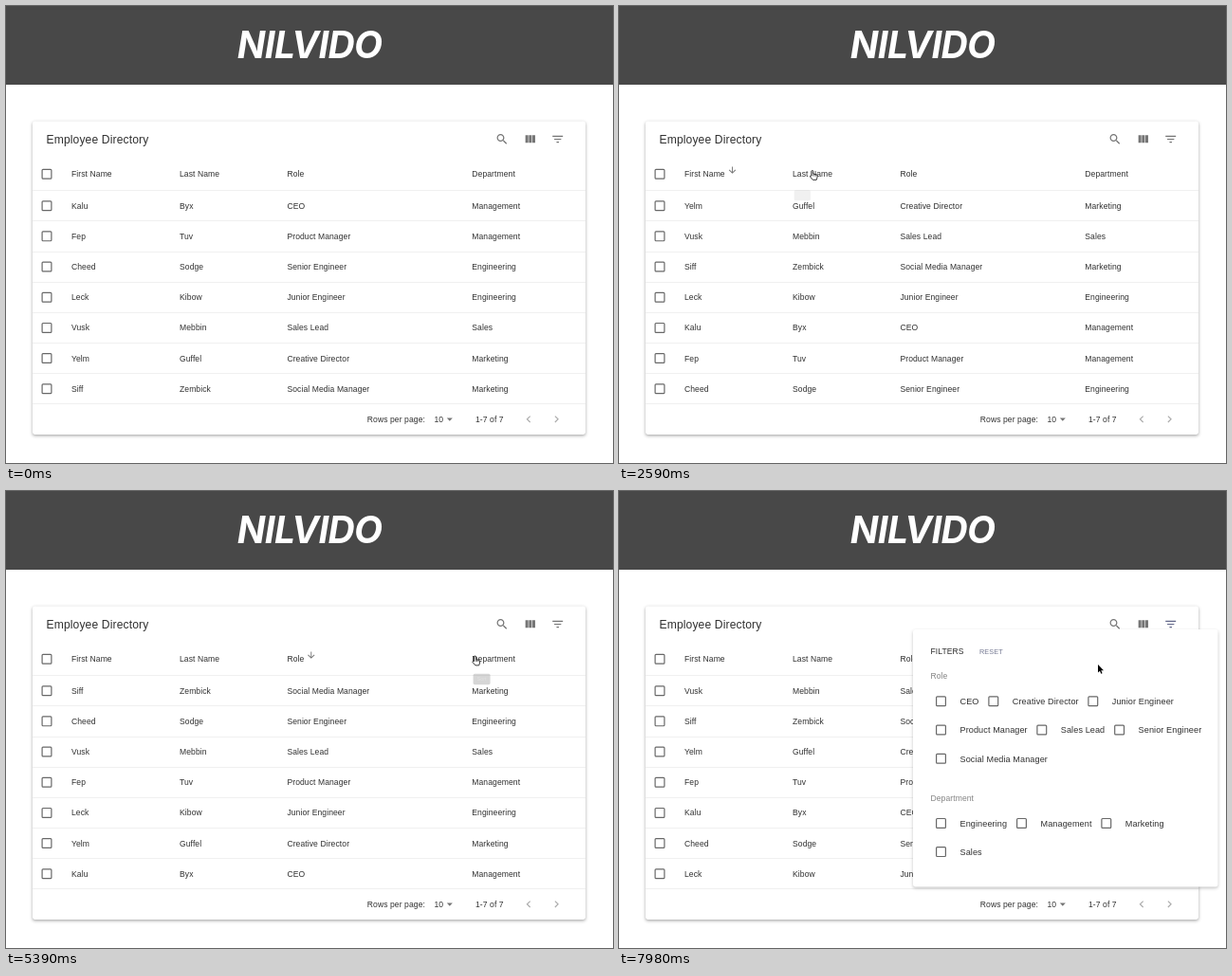
An HTML page with a canvas that plays this animation: 640x482 px, repeating every 8000 ms.

```html
<!DOCTYPE html>
<html lang="en">
<head>
<meta charset="utf-8">
<title>Employee Directory</title>
<style>
html, body { margin: 0; width: 100%; height: 100%; overflow: hidden; background: #fff; }
canvas { display: block; width: 640px; height: 482px; }
</style>
</head>
<body>
<canvas id="stage"></canvas>
<script>
const W = 640, H = 482, LOOP = 8000;
const canvas = document.getElementById('stage');
const ctx = canvas.getContext('2d');
const dpr = window.devicePixelRatio || 1;
canvas.width = W * dpr;
canvas.height = H * dpr;

const SANS = '"Liberation Sans", Arial, sans-serif';
const INK = '#303030', GREY = '#757575', LINE = '#f0f0f0';
const ICON = 14.6;

const icons = {
  search: 'M15.5 14h-.79l-.28-.27C15.41 12.59 16 11.11 16 9.5 16 5.91 13.09 3 9.5 3S3 5.91 3 9.5 5.91 16 9.5 16c1.61 0 3.09-.59 4.23-1.57l.27.28v.79l5 4.99L20.49 19l-4.99-5zm-6 0C7.01 14 5 11.99 5 9.5S7.01 5 9.5 5 14 7.01 14 9.5 11.99 14 9.5 14z',
  columns: 'M10 18h5V5h-5v13zm-6 0h5V5H4v13zM16 5v13h5V5h-5z',
  filter: 'M10 18h4v-2h-4v2zM3 6v2h18V6H3zm3 7h12v-2H6v2z',
  down: 'M20 12l-1.41-1.41L13 16.17V4h-2v12.17l-5.58-5.59L4 12l8 8 8-8z',
  drop: 'M7 10l5 5 5-5z',
  prev: 'M15.41 7.41L14 6l-6 6 6 6 1.41-1.41L10.83 12z',
  next: 'M8.59 16.59L10 18l6-6-6-6-1.41 1.41L13.17 12z'
};
for (const k in icons) icons[k] = new Path2D(icons[k]);
const arrowShape = new Path2D('M0 0V8.6L2 6.8 3.3 9.8 4.6 9.2 3.3 6.3H6z');
const handShape = new Path2D('M-1 5.6V.9a.9.9 0 0 1 1.8 0V3.6L4 4.2q1.3.3 1.2 1.7L4.8 8 4.2 9.9H.4L-2.6 6.4q.2-1.3 1.6-.8z');

const columns = [
  { name: 'First Name', x: 69, arrow: 119.5 },
  { name: 'Last Name', x: 183, arrow: 232.5 },
  { name: 'Role', x: 296.4, arrow: 321.8 },
  { name: 'Department', x: 491.3, arrow: 544.8 }
];
const people = [
  ['Kalu', 'Byx', 'CEO', 'Management'],
  ['Fep', 'Tuv', 'Product Manager', 'Management'],
  ['Cheed', 'Sodge', 'Senior Engineer', 'Engineering'],
  ['Leck', 'Kibow', 'Junior Engineer', 'Engineering'],
  ['Vusk', 'Mebbin', 'Sales Lead', 'Sales'],
  ['Yelm', 'Guffel', 'Creative Director', 'Marketing'],
  ['Siff', 'Zembick', 'Social Media Manager', 'Marketing']
];
const filters = [
  [221.7, [[339.5, 'CEO'], [394.8, 'Creative Director'], [499.8, 'Junior Engineer']]],
  [252, [[339.5, 'Product Manager'], [445.8, 'Sales Lead'], [527.6, 'Senior Engineer']]],
  [282.3, [[339.5, 'Social Media Manager']]],
  [350.4, [[339.5, 'Engineering'], [424.5, 'Management'], [513.8, 'Marketing']]],
  [380.6, [[339.5, 'Sales']]]
];

// Times in ms at which each column gets sorted.
const clicks = [1050, 2950, 4450, 5810];
const tips = [
  { text: 'Sort', x: 79.5, y: 199.8, w: 21, from: 850, to: 1800 },
  { text: 'Sort', x: 193.3, y: 199.8, w: 21, from: 2550, to: 3610 },
  { text: 'Sort', x: 306.8, y: 199.8, w: 21, from: 4120, to: 4790 },
  { text: 'Sort', x: 501.6, y: 198.5, w: 21, from: 5320, to: 6140 },
  { text: 'Filter Table', x: 581.2, y: 170.5, w: 40, from: 6700, to: 7300 }
];
// Pointer tip: time, x, y.
const path = [
  [150, -8, 262], [760, 80, 173], [1740, 80, 173], [2470, 204, 173.5],
  [3420, 204, 173.5], [3640, 250, 151], [4080, 304, 173], [4720, 304, 173],
  [5340, 494.5, 174], [6050, 494.5, 174], [6660, 585, 133.5],
  [7650, 585, 133.5], [7960, 505, 183]
];
const OPEN = 7280, HOVER = 6640;

const clamp = v => Math.max(0, Math.min(1, v));
const ease = v => v * v * (3 - 2 * v);

function text(str, x, y, size = 8.56, color = INK, align = 'left') {
  ctx.font = `${size}px ${SANS}`;
  ctx.letterSpacing = size * 0.0107 + 'px';
  ctx.textAlign = align;
  ctx.fillStyle = color;
  ctx.fillText(str, x, y);
}

function icon(name, x, y, color = GREY, size = ICON) {
  ctx.save();
  ctx.translate(x - size / 2, y - size / 2);
  ctx.scale(size / 24, size / 24);
  ctx.fillStyle = color;
  ctx.fill(icons[name]);
  ctx.restore();
}

function box(x, y, w, h, r) {
  ctx.beginPath();
  ctx.roundRect(x, y, w, h, r);
}

function paper(x, y, w, h, blur, drop, alpha) {
  ctx.save();
  ctx.shadowColor = `rgba(0,0,0,${alpha})`;
  ctx.shadowBlur = blur * dpr;
  ctx.shadowOffsetY = drop * dpr;
  ctx.fillStyle = '#fff';
  box(x, y, w, h, 2.4);
  ctx.fill();
  ctx.restore();
}

function checkbox(x, y) {
  ctx.strokeStyle = '#686868';
  ctx.lineWidth = 1.2;
  box(x - 4.9, y - 4.9, 9.8, 9.8, 0.9);
  ctx.stroke();
}

function rowLine(y) {
  ctx.fillStyle = LINE;
  ctx.fillRect(28, y - 0.5, 583, 1);
}

function banner() {
  ctx.fillStyle = '#484848';
  ctx.fillRect(0, 0, W, 83);
  ctx.font = 'italic 700 39px Inter, sans-serif';
  ctx.letterSpacing = '-0.8px';
  ctx.textAlign = 'center';
  ctx.fillStyle = '#fff';
  ctx.fillText('NILVIDO', 320, 55);
}

function sorted(count) {
  let rows = people;
  for (let c = 0; c < count; c++) {
    rows = [...rows].sort((a, b) => (a[c] < b[c]) - (a[c] > b[c]));
  }
  return rows;
}

function table(t) {
  const count = clicks.filter(c => t >= c).length;
  paper(28, 121.5, 583, 330.5, 3.5, 1.3, 0.36);
  text('Employee Directory', 42.5, 144.6, 12.1);
  icon('search', 523, 140.5);
  icon('columns', 552.5, 140.5);
  icon('filter', 581.7, 140.5, t >= HOVER ? '#626789' : GREY);

  checkbox(43, 177.3);
  columns.forEach((col, i) => {
    text(col.name, col.x, 180.4);
    if (i === count - 1) icon('down', col.arrow, 173.2, GREY, 11);
  });
  rowLine(194.5);

  sorted(count).forEach((row, i) => {
    const y = 210.7 + i * 32.17;
    checkbox(43, y);
    row.forEach((cell, c) => text(cell, columns[c].x, y + 3.1));
    rowLine(Math.round(y + 15.7) + 0.5);
  });

  text('Rows per page:', 380.8, 439);
  text('10', 451.5, 439);
  icon('drop', 467.8, 435.8);
  text('1-7 of 7', 495, 439);
  icon('prev', 551, 435.8, '#adadad');
  icon('next', 580.5, 435.8, '#adadad');
}

function tooltip(tip, t) {
  const a = ease(clamp((t - tip.from) / 200)) * (1 - ease(clamp((t - tip.to) / 150)));
  if (a <= 0) return;
  ctx.save();
  ctx.globalAlpha = a;
  ctx.translate(tip.x, tip.y);
  ctx.scale(0.8 + 0.2 * a, 0.8 + 0.2 * a);
  ctx.fillStyle = 'rgba(97,97,97,0.9)';
  box(-tip.w / 2, -6.7, tip.w, 13.4, 2);
  ctx.fill();
  text(tip.text, 0, 2.2, 6.1, '#fff', 'center');
  ctx.restore();
}

function popover(t) {
  const p = clamp((t - OPEN) / 280);
  if (p <= 0) return;
  const k = 1 - (1 - p) ** 3;
  ctx.save();
  ctx.globalAlpha = k;
  ctx.translate(582, 146);
  ctx.scale(0.75 + 0.25 * k, 0.5625 + 0.4375 * k);
  ctx.translate(-582, -146);
  paper(310, 146, 321.5, 271.5, 3.5, 1.6, 0.24);
  text('FILTERS', 328.5, 172.2);
  text('RESET', 380, 171.9, 7.3, '#777b94');
  text('Role', 328.5, 198.4, 8.56, '#858585');
  text('Department', 328.5, 327.3, 8.56, '#858585');
  for (const [y, items] of filters) {
    for (const [x, label] of items) {
      checkbox(x, y);
      text(label, x + 20, y + 3.2, 9.1);
    }
  }
  ctx.restore();
}

function pointerAt(t) {
  const i = path.findIndex(k => k[0] > t);
  if (i === 0) return null;
  if (i < 0) return path[path.length - 1].slice(1);
  const [t0, x0, y0] = path[i - 1], [t1, x1, y1] = path[i];
  const k = ease((t - t0) / (t1 - t0));
  return [x0 + (x1 - x0) * k, y0 + (y1 - y0) * k];
}

function pointer(t) {
  const at = pointerAt(t);
  if (!at) return;
  const [x, y] = at;
  const onLabel = y > 167 && y < 186 && columns.some(c => x >= c.x - 2 && x <= c.arrow - 5);
  const onIcon = y > 128 && y < 150 && x > 512 && x < 594;
  const hand = t < 7700 && (onLabel || onIcon);
  const shape = hand ? handShape : arrowShape;
  ctx.save();
  ctx.translate(x, y);
  ctx.lineJoin = 'round';
  ctx.lineWidth = hand ? 0.9 : 1.2;
  ctx.strokeStyle = hand ? '#222' : '#fff';
  ctx.fillStyle = hand ? '#fff' : '#000';
  if (hand) ctx.fill(shape);
  ctx.stroke(shape);
  if (!hand) ctx.fill(shape);
  if (hand) {
    ctx.lineWidth = 0.6;
    ctx.beginPath();
    for (const fx of [0.8, 2.2, 3.6]) {
      ctx.moveTo(fx, 4);
      ctx.lineTo(fx, 6);
    }
    ctx.stroke();
  }
  ctx.restore();
}

function draw(t) {
  ctx.setTransform(dpr, 0, 0, dpr, 0, 0);
  ctx.fillStyle = '#fff';
  ctx.fillRect(0, 0, W, H);
  banner();
  table(t);
  tips.forEach(tip => tooltip(tip, t));
  popover(t);
  pointer(t);
}

const start = performance.now();
function tick() {
  draw((performance.now() - start) % LOOP);
  requestAnimationFrame(tick);
}
tick();
</script>
</body>
</html>
```
